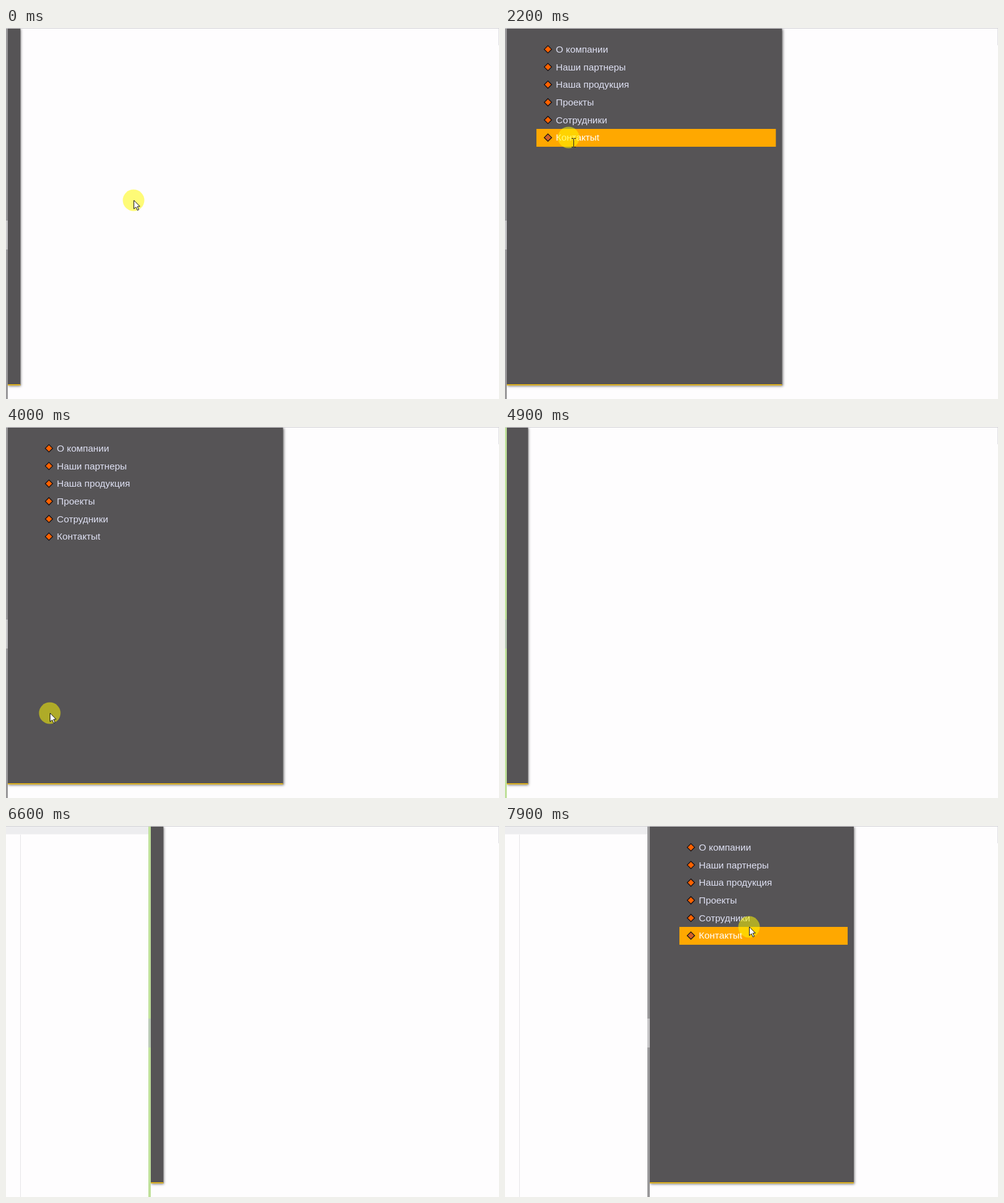
An HTML page with a canvas that plays this animation: 800 by 603 pixels, repeating every 8000 ms.

```html
<!DOCTYPE html>
<html lang="ru">
<head>
<meta charset="utf-8">
<title>Меню</title>
<style>
  html, body { margin: 0; width: 100%; height: 100%; overflow: hidden; background: #fefdfe; }
  canvas { display: block; }
</style>
</head>
<body>
<canvas id="stage" width="800" height="603"></canvas>
<script>
const ctx = document.getElementById('stage').getContext('2d');
const W = 800, H = 603, LOOP = 8000, STEP = 100;
const ITEMS = ['О компании', 'Наши партнеры', 'Наша продукция', 'Проекты', 'Сотрудники', 'Контактыt'];
const ROW_TOP = 20.3, ROW_H = 28.7, SLIDE = 800;
const FONT = '15.35px "Liberation Sans", Arial, sans-serif';

// Pointer stops: time, x, y
const PATHS = [
  [[0, 207, 280], [400, 130, 300], [900, 14, 331], [1300, 32, 335], [1800, 84, 290],
   [2300, 108, 150], [2700, 104, 34], [2850, 102, 36], [3100, 99, 91], [3500, 82, 178],
   [3600, 78, 207], [4000, 71, 465], [4290, -20, 472]],
  [[6700, 240, 318], [7000, 262, 300], [7400, 335, 205], [7600, 362, 108], [7900, 396, 164], [8000, 398, 168]]
];

const clamp = v => Math.min(1, Math.max(0, v));
const lerp = (a, b, k) => a + (b - a) * k;

// CSS "ease" curve: cubic-bezier(.25, .1, .25, 1)
function ease(x) {
  if (x <= 0 || x >= 1) return clamp(x);
  let lo = 0, hi = 1, u = 0.5;
  for (let i = 0; i < 24; i++) {
    u = (lo + hi) / 2;
    const bx = 0.75 * u * (1 - u) + u ** 3;
    if (bx < x) lo = u; else hi = u;
  }
  return 0.3 * u * (1 - u) ** 2 + 3 * u * u * (1 - u) + u ** 3;
}

const slide = (t, start) => ease((t - start) / SLIDE);

function openness(t) {
  if (t < 4284) return slide(t, 876);
  if (t < 6000) return 1 - slide(t, 4284);
  return slide(t, 6700);
}

function pointerAt(t) {
  for (const path of PATHS) {
    for (let i = 1; i < path.length; i++) {
      const [t0, x0, y0] = path[i - 1], [t1, x1, y1] = path[i];
      if (t >= t0 && t < t1) {
        const k = (t - t0) / (t1 - t0);
        return { x: lerp(x0, x1, k), y: lerp(y0, y1, k) };
      }
    }
  }
  return null;
}

function rect(x, y, w, h, color) {
  ctx.fillStyle = color;
  ctx.fillRect(x, y, w, h);
}

function polygon(points, fill, stroke, width) {
  ctx.beginPath();
  points.forEach(([x, y]) => ctx.lineTo(x, y));
  ctx.closePath();
  ctx.fillStyle = fill;
  ctx.fill();
  ctx.strokeStyle = stroke;
  ctx.lineWidth = width;
  ctx.stroke();
}

function drawPage(barX) {
  rect(0, 0, W, H, '#fefdfe');
  if (barX > 0) {
    rect(0, 1, barX, 12, '#ededef');
    rect(0, 13, barX, 1, '#f6f6f7');
    rect(23, 14, 1, H, '#e6e5e8');
  }
  rect(0, 0, W, 1, '#d3d2d6');
  rect(799, 1, 1, 27, '#e0dfe4');
}

function drawBar(x, green) {
  rect(x, 1, 4, H, green ? '#bfe09a' : '#99989a');
  rect(x, 313, 4, 47, green ? '#b9c9b4' : '#c3c2c4');
}

function drawPanel(left, right) {
  ctx.save();
  ctx.shadowColor = 'rgba(0,0,0,.55)';
  ctx.shadowBlur = 4;
  ctx.shadowOffsetX = ctx.shadowOffsetY = 1;
  ctx.beginPath();
  ctx.rect(left, 1, W, H);
  ctx.clip();
  rect(left, 1, right - left, 580, '#565456');
  ctx.restore();
  rect(left, 579, right - left, 2, '#e2b522');
}

function drawMenu(left, right, p, hover) {
  const shift = left - (1 - p) * 262;
  ctx.save();
  ctx.beginPath();
  ctx.rect(left, 1, right - left, 578);
  ctx.clip();
  ctx.globalAlpha = p ** 1.5;
  ctx.font = FONT;
  ITEMS.forEach((label, i) => {
    const on = i === hover, y = ROW_TOP + ROW_H * (i + 0.5), x = shift + 66.7;
    if (on) {
      const top = Math.round(ROW_TOP + ROW_H * i);
      rect(shift + 48, top, right - 10 - shift - 48, 29, '#ffa800');
    }
    polygon([[x, y - 6], [x + 6, y], [x, y + 6], [x - 6, y]], on ? '#d2602a' : '#ff6200', '#151015', 1.3);
    ctx.fillStyle = on ? '#ffffff' : '#dfe1f4';
    ctx.fillText(label, shift + 79.6, y + 5.3);
  });
  ctx.restore();
}

function drawArrow(x, y) {
  const shape = [[0, 0], [0, 14], [3.3, 11], [5.8, 16.3], [8, 15.3], [5.6, 10.2], [9.8, 10]];
  polygon(shape.map(([dx, dy]) => [x + 0.5 + dx, y + dy]), '#ffffff', '#111111', 1);
}

function drawBeam(x, y) {
  const cx = Math.round(x + 8), cy = Math.round(y + 8);
  rect(cx, cy - 6, 1, 13, '#222222');
  for (const dy of [-7, 7]) {
    rect(cx - 3, cy + dy, 3, 1, '#222222');
    rect(cx + 1, cy + dy, 3, 1, '#222222');
  }
}

function drawPointer(pos, beam) {
  ctx.beginPath();
  ctx.arc(pos.x, pos.y, 17.5, 0, Math.PI * 2);
  ctx.fillStyle = 'rgba(255,250,0,.53)';
  ctx.fill();
  (beam ? drawBeam : drawArrow)(pos.x, pos.y);
}

function hoverState(pos, left, right, p) {
  if (!pos || p < 0.3) return { row: -1, beam: false };
  const shift = left - (1 - p) * 262;
  const row = Math.floor((pos.y - ROW_TOP + 0.5) / ROW_H);
  if (!ITEMS[row] || pos.x < shift + 48 || pos.x > right - 10) return { row: -1, beam: false };
  ctx.font = FONT;
  const dx = pos.x - shift - 79.6;
  const dy = pos.y - ROW_TOP - ROW_H * (row + 0.5);
  return { row, beam: dx > 0 && dx < ctx.measureText(ITEMS[row]).width && Math.abs(dy) < 9 };
}

function draw(t) {
  const barX = t < 6300 ? -1 : 231;
  const left = barX + 4;
  const p = openness(t);
  const right = lerp(barX + 24.4, barX < 0 ? 449.5 : 566, p);
  const pos = pointerAt(t);
  const { row, beam } = hoverState(pos, left, right, p);

  drawPage(barX);
  drawBar(barX, t >= 4600 && t < 6700);
  drawPanel(left, right);
  drawMenu(left, right, p, row);

  // The dragged bar travels ahead; the layout follows on release.
  if (t >= 5500 && t < 6300) {
    const k = clamp((t - 5500) / 600);
    drawBar(Math.round(lerp(-1, 231, k * k * (3 - 2 * k))), true);
  }
  if (pos) drawPointer(pos, beam);
}

const start = performance.now();
function tick(now) {
  const t = Math.max(0, now - start) % LOOP;
  draw(Math.floor(t / STEP) * STEP);
  requestAnimationFrame(tick);
}
draw(0);
requestAnimationFrame(tick);
</script>
</body>
</html>
```
